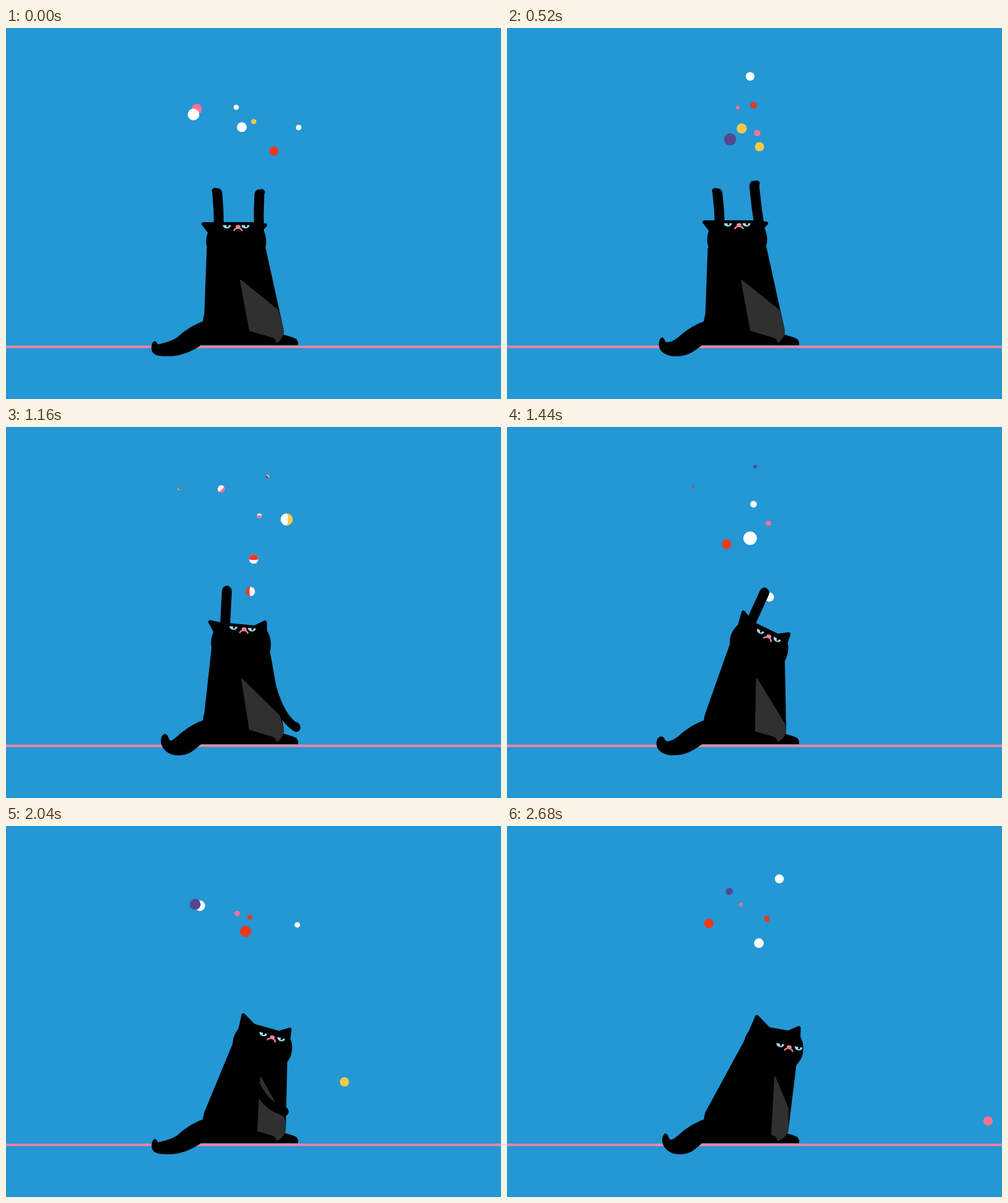
Write an HTML page with a canvas that moves like this. It is 800 px wide and 600 px high and loops after 2.72 s.

```html
<!DOCTYPE html>
<html lang="en">
<head>
<meta charset="utf-8">
<title>Juggling cat</title>
<style>
html, body { margin: 0; width: 100%; height: 100%; overflow: hidden; background: #2497d5; }
canvas { display: block; }
</style>
</head>
<body>
<canvas id="stage" width="800" height="600"></canvas>
<script>
const ctx = document.getElementById('stage').getContext('2d');
const LOOP = 2720, STEP = 40, ORBIT = 1960, JUGGLE = 520, STRIPE = 400;
const TAU = Math.PI * 2;
const COLORS = { W: '#ffffff', R: '#f0381c', Y: '#fccb45', P: '#534890', K: '#ff7294' };
const PINK = '#f0829f', EYE = '#9edcf0', BELLY = '#303030';

const clamp = v => Math.min(1, Math.max(0, v));
const wave = (t, peak = 0, period = ORBIT) => Math.cos(TAU * (t - peak) / period);
const mix = (a, b, k) => a.map((v, i) => v + (b[i] - v) * k);
function ease(t, from, to) {
  const u = clamp((t - from) / (to - from));
  return u * u * (3 - 2 * u);
}

// Smooth curve through key points given as [time, ...values].
function track(...keys) {
  const last = keys.length - 1;
  const slope = (i, j) => {
    const a = keys[Math.max(i - 1, 0)], b = keys[Math.min(i + 1, last)];
    return (b[j] - a[j]) / (b[0] - a[0]);
  };
  return t => {
    let i = 0;
    while (i < last - 1 && t >= keys[i + 1][0]) i++;
    const p = keys[i], q = keys[i + 1], d = q[0] - p[0];
    const u = clamp((t - p[0]) / d), v = 1 - u;
    return p.map((_, j) =>
      p[j] * v * v * (1 + 2 * u) + q[j] * u * u * (3 - 2 * u) +
      d * u * v * (v * slope(i, j) - u * slope(i + 1, j))).slice(1);
  };
}

// x, y, tilt in degrees
const headAt = track([0, 372, 343, 0], [520, 372, 340, 0], [840, 372, 339, 0],
  [1160, 380, 348, 5], [1440, 408, 352, 26], [2040, 415, 354, 16], [2680, 431, 356, 10]);
const leftPawAt = track([0, 344.5, 267], [840, 344.5, 267], [1160, 357, 265],
  [1440, 416, 268], [1720, 472, 375], [2040, 450, 462], [2300, 405, 460]);
const rightPawAt = track([0, 406.5, 269], [840, 406.5, 269], [1010, 488, 385],
  [1160, 469, 486], [1440, 434, 450]);
const tossAt = track([0, 433, 199], [520, 408, 192], [840, 381, 227],
  [1160, 395, 266], [1440, 424, 275]);

// The tossed ball slips past the paw, falls and bounces away.
function tossedBall(t) {
  const g = 0.00222, floor = 506, top = 270, kick = 0.652;
  let [x, y] = tossAt(t);
  const roll = Math.max(0, t - 1440), fall = Math.max(0, t - 1680);
  const after = fall - Math.sqrt(2 * (floor - top) / g);
  x += 0.13 * roll + 0.000125 * roll * roll;
  if (after > 0) y = floor - kick * after + g * after * after / 2;
  else if (fall > 0) y = top + g * fall * fall / 2;
  return [x, y, 7.5];
}

// Tilted orbit: the ball swings sideways, and grows as it comes down and near.
const orbit = (x, width, xPeak, y, height, yPeak, size, growth) => t => {
  const near = wave(t, yPeak);
  return [x + width * wave(t, xPeak), y + height * near, size + growth * near];
};

const balls = [
  ['RYRWWYK', tossedBall],
  ['WPYRRRR', orbit(335, 55, 180, 140, 47, 350, 6, 4.5)],
  ['KYWRRWW', orbit(362, 55, 910, 172, 43, 1080, 8, -0.5)],
  ['WRKWWWP', orbit(405, 68, 0, 128, 33, 0, 5.3, -0.8)],
  ['WWYWPPW', orbit(385, 82, 980, 130, 52, 1530, 9, 2)],
  ['WKYPPKR', orbit(400, 28, 960, 118, 54, 430, 4, 1.2)],
  ['YKWKKRK', orbit(398, 25, 1500, 143, 16, 1640, 3.8, 0.7)]
].map(([stripes, path], i) => ({ stripes, path, spin: -i * TAU / 8 }));

function drawBall({ pos: [x, y, r], stripes, spin }, t) {
  const index = Math.floor(t / STRIPE);
  const cover = clamp((t / STRIPE - index - 0.75) * 4);
  ctx.save();
  ctx.translate(x, y);
  ctx.scale(r, r);
  ctx.rotate(spin);
  ctx.fillStyle = COLORS[stripes[index]];
  ctx.beginPath();
  ctx.arc(0, 0, 1, 0, TAU);
  ctx.fill();
  if (cover > 0 && index + 1 < stripes.length) {
    const edge = 1 - 2 * cover;
    ctx.fillStyle = COLORS[stripes[index + 1]];
    ctx.beginPath();
    ctx.arc(0, 0, 1, -TAU / 4, TAU / 4);
    ctx.ellipse(0, 0, Math.abs(edge), 1, 0, TAU / 4, -TAU / 4, edge > 0);
    ctx.fill();
  }
  ctx.restore();
}

// Everything about the pose follows from the head and how far it has turned.
function poseAt(t) {
  const [x, y, tilt] = headAt(t);
  const angle = tilt * TAU / 360, c = Math.cos(angle), s = Math.sin(angle);
  return {
    x, y, angle,
    turn: clamp((x - 372) / 59),
    place: (px, py) => [x + px * c - py * s, y + px * s + py * c]
  };
}

function polygon(...points) {
  ctx.beginPath();
  points.forEach(p => ctx.lineTo(...p));
  ctx.closePath();
  ctx.fill();
}

function drawTail(t) {
  const sway = -wave(t);
  const curl = 4 * Math.max(0, -Math.sin(TAU * t / ORBIT));
  const x = 249.5 + 9.5 * sway, y = 505.5 - 5.5 * sway;
  const left = x - 5 - curl, bottom = 531;
  ctx.beginPath();
  ctx.moveTo(330, 471);
  ctx.bezierCurveTo(302, 478, 286, 492, 277, 500);
  ctx.bezierCurveTo(268, 507, x + 8, 511, x + 5, y + 1);
  ctx.bezierCurveTo(x + 3, y - 7, left + 1, y - 7, left, y + 6);
  ctx.bezierCurveTo(left, y + 19, left + 12, bottom, left + 28, bottom);
  ctx.bezierCurveTo(left + 48, bottom, 303, 522, 318, 511);
  ctx.fill();
}

function drawBody({ x, turn }) {
  const hip = 449 + 6 * turn * turn;
  ctx.beginPath();
  ctx.moveTo(x - 47.5, 355 - 8 * turn);
  ctx.lineTo(x + 47 - 10 * turn, 353 + 31 * turn);
  ctx.lineTo(hip, 489);
  ctx.quadraticCurveTo(hip, 500, 440, 513);
  ctx.lineTo(313, 513);
  ctx.lineTo(318, 475);
  ctx.quadraticCurveTo(318.5, 469, 320.5, 463);
  ctx.fill();
  ctx.beginPath();
  ctx.moveTo(435, 513);
  ctx.lineTo(472, 513);
  ctx.quadraticCurveTo(474, 504, 464, 500.5);
  ctx.lineTo(446, 495);
  ctx.fill();
}

function drawBelly({ turn }) {
  const hip = 448 + 6 * turn * turn, tuck = turn ** 3;
  ctx.fillStyle = ctx.strokeStyle = BELLY;
  ctx.lineWidth = 2;
  ctx.beginPath();
  ctx.moveTo(379 + 54 * turn ** 1.6, 408 - 2 * turn);
  ctx.lineTo(440 + 14 * turn, 457 + 25 * Math.sin(turn * Math.PI));
  ctx.lineTo(hip, 489);
  ctx.quadraticCurveTo(hip, 501, 438, 508.5);
  ctx.quadraticCurveTo(437, 501, 428, 499);
  ctx.lineTo(394 + 34 * tuck, 489 + 10 * tuck);
  ctx.closePath();
  ctx.fill();
  ctx.stroke();
  ctx.fillStyle = ctx.strokeStyle = '#000';
}

function drawArm(shoulder, [x, y], bend, width, sway) {
  const [mx, my] = mix(shoulder, [x, y], 0.5);
  x += sway;
  ctx.lineWidth = width;
  ctx.beginPath();
  ctx.moveTo(...shoulder);
  ctx.quadraticCurveTo(mx + bend[0], my + bend[1], x, y);
  ctx.stroke();
  ctx.beginPath();
  ctx.arc(x + sway * 1.3, y - 3.5, 5, 0, TAU);
  ctx.fill();
}

function drawLeftArm(t, { place }, sway) {
  const drop = ease(t, 1500, 1900);
  drawArm(mix(place(-28, -18), [400, 410], drop), leftPawAt(t),
    [-9 * drop, 16 * drop], 16 - 2 * drop, -sway);
}

function drawRightArm(t, { place }, sway) {
  const drop = ease(t, 840, 1100);
  drawArm(mix(place(37, -13), [419, 370], drop), rightPawAt(t),
    [-10 * drop, 37 * drop], 16 - 2 * drop, sway);
}

function drawHead({ x, y, angle, turn, place }) {
  const perk = clamp(turn * 7), sq = turn * turn;
  ctx.lineWidth = 6;
  polygon(place(-42, -12), place(-53 + 18 * sq, -26 - 16 * turn), place(-35 + 22 * sq, -26));
  ctx.stroke();
  polygon(place(18, -25), place(47 - 12 * perk, -24 - 12 * perk), place(38, -15));
  ctx.stroke();
  ctx.save();
  ctx.translate(x, y);
  ctx.rotate(angle);
  ctx.beginPath();
  ctx.moveTo(-40, 26);
  for (const side of [-1, 1]) {
    const curve = side < 0
      ? [[-45, 18, -48.5, 11, -48.5, 3], [-48.5, -14, -39, -29, -26, -29]]
      : [[39, -29, 48.5, -14, 48.5, 3], [48.5, 11, 45, 18, 40, 26]];
    if (side > 0) ctx.lineTo(26, -29);
    curve.forEach(c => ctx.bezierCurveTo(...c));
  }
  ctx.fill();
  ctx.restore();
}

function drawFace({ angle, turn, place }) {
  ctx.save();
  ctx.translate(...place(3 + 22 * turn ** 3, -21 + 18.6 * turn ** 4));
  ctx.rotate(angle);
  for (const side of [-15, 15]) {
    const x = side - 3 * (1 - turn);
    ctx.fillStyle = EYE;
    ctx.beginPath();
    ctx.ellipse(x, -3.2, 6.5, 5.4, 0, 0, Math.PI);
    ctx.fill();
    ctx.fillStyle = '#000';
    ctx.beginPath();
    ctx.ellipse(x + 1, -2.7, 1.7, 3, 0, 0, TAU);
    ctx.fill();
  }
  ctx.fillStyle = ctx.strokeStyle = PINK;
  ctx.beginPath();
  ctx.ellipse(0, -0.7, 4, 2.7, 0, 0, TAU);
  ctx.fill();
  ctx.lineWidth = 2.4;
  ctx.beginPath();
  ctx.moveTo(-6.5, 5.5);
  ctx.quadraticCurveTo(-5, 2, 0, 1.5);
  ctx.quadraticCurveTo(5, 2, 6.5, 5.5);
  ctx.stroke();
  ctx.restore();
}

function draw(t) {
  const pose = poseAt(t);
  const sway = 3 * wave(t, 0, JUGGLE) * (1 - ease(t, 840, 1160));
  ctx.fillStyle = '#2497d5';
  ctx.fillRect(0, 0, 800, 600);
  ctx.fillStyle = PINK;
  ctx.fillRect(0, 513.7, 800, 4);
  balls.map(ball => ({ ...ball, pos: ball.path(t) }))
    .sort((a, b) => a.pos[2] - b.pos[2])
    .forEach(ball => drawBall(ball, t));
  ctx.fillStyle = ctx.strokeStyle = '#000';
  ctx.lineCap = ctx.lineJoin = 'round';
  drawTail(t);
  drawBody(pose);
  drawRightArm(t, pose, sway);
  drawBelly(pose);
  drawHead(pose);
  drawLeftArm(t, pose, sway);
  drawFace(pose);
}

const start = performance.now();
function frame() {
  const t = (performance.now() - start) % LOOP;
  draw(Math.floor(t / STEP) * STEP);
  requestAnimationFrame(frame);
}
frame();
</script>
</body>
</html>
```
